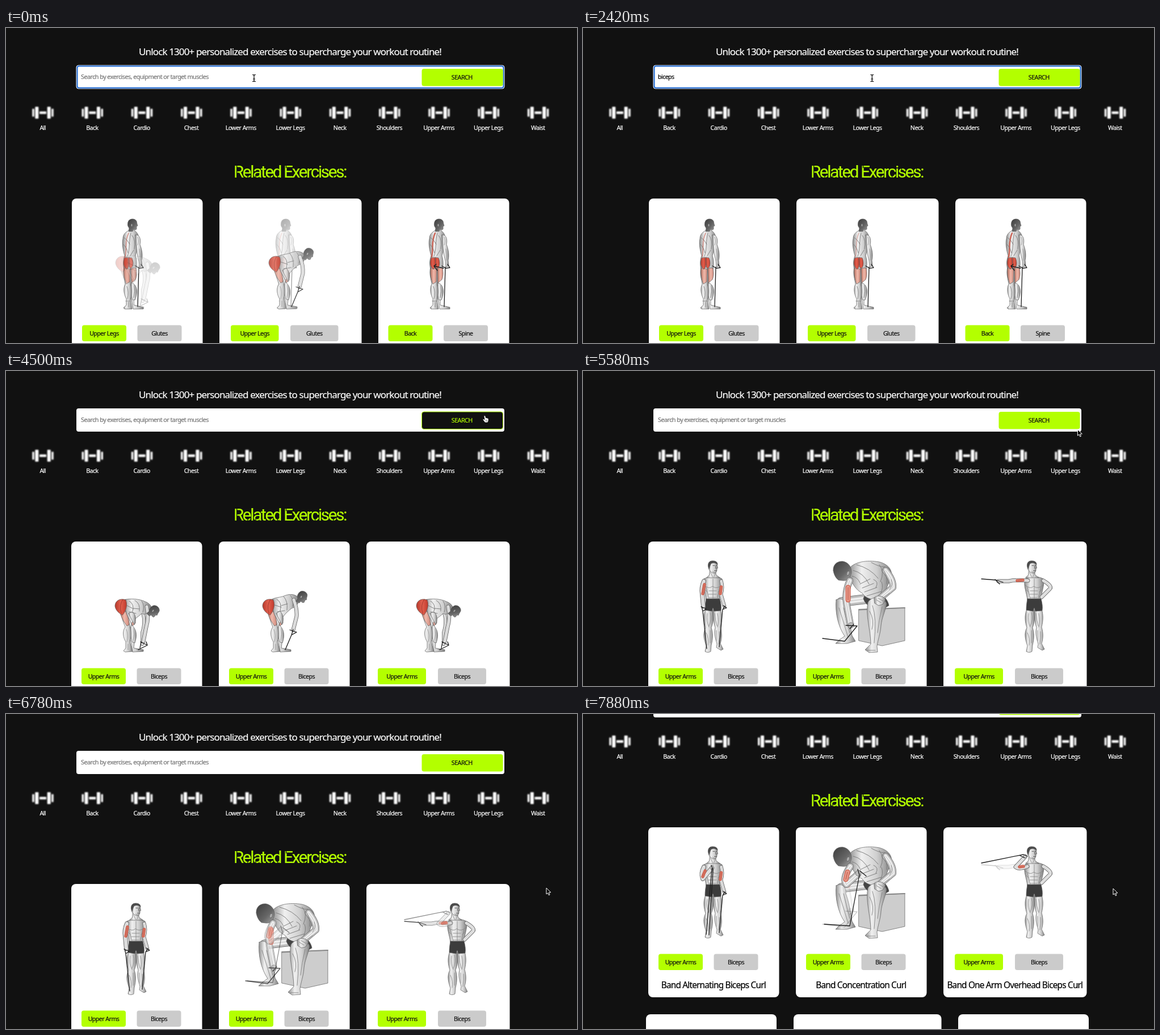
Recreate the animation shown at these times as an HTML page. Size 1006 by 556 pixels, loop 8 s.

```html
<!DOCTYPE html>
<html lang="en">
<head>
<meta charset="utf-8">
<title>Exercise search</title>
<style>
html, body { margin: 0; width: 100%; height: 100%; overflow: hidden; background: #111; }
svg { display: block; width: 100%; height: 100%; }
text { font-family: "Noto Sans", "Open Sans", sans-serif; letter-spacing: -.052em; white-space: pre; stroke-width: .2px; }
#title { font: 400 29.5px Roboto, Inter, sans-serif; letter-spacing: -2.25px; fill: #b3ff00; stroke: #b3ff00; }
path { stroke-linecap: round; stroke-linejoin: round; }
</style>
</head>
<body>
<svg id="stage" viewBox="0 0 1006 556">
  <defs>
    <linearGradient id="skin">
      <stop offset="0" stop-color="#8c8c8c"/><stop offset=".3" stop-color="#f0f0f0"/>
      <stop offset=".65" stop-color="#d0d0d0"/><stop offset="1" stop-color="#828282"/>
    </linearGradient>
    <linearGradient id="red">
      <stop offset="0" stop-color="#b5382b"/><stop offset=".5" stop-color="#e2604e"/>
      <stop offset="1" stop-color="#c03a2c"/>
    </linearGradient>
    <linearGradient id="pale">
      <stop offset="0" stop-color="#b9705f"/><stop offset=".5" stop-color="#f0b9ab"/>
      <stop offset="1" stop-color="#cf8a7c"/>
    </linearGradient>
    <linearGradient id="hair" x2="1" y2="1">
      <stop offset="0" stop-color="#3c3c3c"/><stop offset=".6" stop-color="#666"/>
      <stop offset="1" stop-color="#a5a5a5"/>
    </linearGradient>
    <filter id="soft"><feGaussianBlur stdDeviation="1"/></filter>
  </defs>
  <g id="page"></g>
  <g id="pointer"></g>
</svg>
<script>
const LOOP = 8000, LIME = '#b3ff00', DARK = '#111';
const $ = id => document.getElementById(id);
const set = (id, attrs) => { for (const k in attrs) $(id).setAttribute(k, attrs[k]); };
const show = (id, on) => set(id, { display: on ? 'inline' : 'none' });

// Drawing helpers
const rect = (x, y, w, h, r, fill, more = '') =>
  `<rect x="${x}" y="${y}" width="${w}" height="${h}" rx="${r}" fill="${fill}" ${more}/>`;
const label = (x, y, str, size = 10.65, fill = '#fff', anchor = 'middle', more = '') =>
  `<text x="${x}" y="${y}" font-size="${size}" fill="${fill}" stroke="${fill}" text-anchor="${anchor}" ${more}>${str}</text>`;
const group = (id, body) => `<g id="${id}">${body}</g>`;
const shape = (d, fill = 'url(#skin)') => `<path d="${d}" fill="${fill}" stroke="#5c5c5c" stroke-width=".7"/>`;
const line = (d, w = .6, c = '#777') => `<path d="${d}" fill="none" stroke="${c}" stroke-width="${w}"/>`;
const limb = (d, w) => line(d, w, '#666') + line(d, w - 1.3, '#bcbcbc') + line(d, w * .5, '#eee') + line(d, .5, '#999');
const band = d => line(d, 1.3, '#1c1c1c');
const ellipse = (x, y, rx, ry, fill, turn = 0) =>
  `<ellipse cx="${x}" cy="${y}" rx="${rx}" ry="${ry}" fill="${fill}" stroke="#555" stroke-width=".6" transform="rotate(${turn} ${x} ${y})"/>`;

// Head seen from the side and behind
const sideHead = (x, y, turn) => `<g transform="translate(${x} ${y}) rotate(${turn})">` +
  shape('M-7 -4C-6 -11 5 -12 8 -6L9 -1L10 2L8 3L8 8C6 10 3 9 2 8L1 12L-6 12L-5 6C-8 3 -8 -1 -7 -4Z', 'url(#hair)') +
  ellipse(-.5, 1, 1.4, 2.5, '#aaa') + '</g>';

// Head seen from the front, turned a little to the right
const frontHead = (x, y) => `<g transform="translate(${x} ${y})">` +
  shape('M-5 5L-6 14L-11 19L13 19L6 14L5 6Z') +
  line('M-4 9L0 18M5 9L2 18', .7) +
  shape('M-8 -3C-7 -11 8 -12 8 -3L9 2L7.500 3C8 7 6 11 3 11C-1 11 -6 7 -7 3Z') +
  shape('M-7 2C-10 -7 -6 -11 0 -11C6 -11 9 -8 8.500 -4C5 -8 1 -8 -3 -6L-5 -1L-6 3Z', '#4a4a4a') +
  line('M.5 -2.500h3M5.500 -2.500h2M5 -1L6 3M3 6.500h4', .9, '#555') +
  line('M0 8C2 10 5 10 6 8', 1, '#888') + '</g>';

const standing = spine =>
  shape('M219 422C220 434 222 444 221 452C219 462 222 472 225 480L225 489L242 493L242 496L224 496L222 484C217 470 217 440 216 424Z') +
  shape('M221 450C231 452 233 466 227 480L223 480C219 470 219 460 221 450Z') +
  shape('M217 357C211 360 206 364 206 372C204 380 206 392 209 402C206 410 206 418 208 426L229 426C231 416 230 408 228 402C231 392 234 384 234 372C234 364 230 360 226 357Z') +
  shape('M208 422C205 434 209 444 210 452C206 460 208 470 212 478L212 489L207 494L209 496L222 496L219 480C222 470 222 460 219 452C221 440 221 430 219 422Z') +
  shape('M208 424C207 434 209 444 212 452L218 448L219 426Z', 'url(#pale)') +
  shape('M220 424L221 450L228 444C231 436 230 430 229 424Z', 'url(#pale)') +
  shape('M209 406C206 414 207 422 213 426C217 424 218 412 215 405Z', 'url(#red)') +
  shape('M216 405C217 414 216 422 219 424C225 424 225 412 222 406Z', 'url(#red)') +
  line('M216 362C209 376 213 390 210 404', spine, '#c96153') +
  line('M220 362C216 376 219 390 214 403M208 370Q214 374 218 382M222 366Q229 374 226 390M207 382Q213 388 215 397M225 392L219 402M213 456Q217 466 214 478M226 454Q228 464 225 476M211 482h8M216 484v9', .8, '#707070') +
  shape('M228 365C236 364 238 374 236 382C240 392 241 402 239 410L240 420L235 422L234 411C231 400 230 390 229 382Z') +
  line('M232 369Q235 376 232 383M235 390Q237 400 236 410', .6) +
  sideHead(222, 347, 0) +
  band('M234 422L232 492M235 424L228 420M238 417L242 423L235 424');

const bentLegs =
  shape('M214 424C222 434 224 444 222 453C219 464 223 474 227 481L226 489L243 492L243 495L224 496L221 478C215 462 212 442 204 426Z') +
  shape('M222 448C232 456 232 468 228 480L223 478C220 466 218 456 222 448Z') +
  shape('M203 422C204 436 209 446 211 452C205 460 208 472 212 478L212 489L208 494L211 496L224 495L219 478C222 470 222 460 219 451C218 442 214 430 210 422Z') +
  shape('M201 422C203 434 209 443 214 450L218 448C218 438 214 428 211 423Z', 'url(#pale)') +
  shape('M212 424C218 434 221 442 224 450L229 445C229 436 223 430 219 425Z', 'url(#pale)') +
  line('M213 456Q217 466 214 478M226 454Q228 464 225 476M216 482v10M231 491l5 2', .6);
const rump =
  shape('M212 404C200 400 193 407 193 415C194 423 201 428 206 431C212 425 216 413 212 404Z', 'url(#red)') +
  line('M207 403Q200 412 204 428', .7, '#8b2a20');

const bentLow = bentLegs +
  limb('M240 422Q248 440 241 462L241 482', 6) +
  shape('M207 404C220 401 236 402 246 407C254 410 259 416 257 422C252 428 246 431 240 428C232 436 226 437 222 446L214 430C210 420 212 410 207 404Z') +
  shape('M224 425C230 430 231 440 227 448L217 428Z') +
  line('M218 406Q228 412 224 424M228 405Q238 410 236 424M240 406Q246 414 242 426M214 414l12 6M226 419l10 1M218 425l12 3', .9, '#777') +
  rump + limb('M249 416Q253 436 248 452L243 477', 7) +
  sideHead(261, 423, 42) + band('M238 478L250 484M248 478L250 484L234 492M239 478L237 489');

const bentHigh = bentLegs +
  shape('M207 404C216 399 224 400 231 397C240 393 251 393 257 401C258 412 250 417 244 419C234 427 227 434 223 446L214 430C210 420 212 410 207 404Z') +
  shape('M224 424C230 430 231 440 227 448L217 428Z') +
  line('M218 403Q228 408 224 424M230 398Q238 406 236 422M242 396Q249 404 246 416M214 413l12 4M226 414l11 -3M219 425l13 -2', .9, '#777') +
  rump + limb('M248 404Q254 420 253 433L247 457', 7) +
  sideHead(262, 398, 24) + band('M241 457L253 461L244 466L233 492M247 456L244 466');

// Legs, shorts and torso shared by the two front views
const frontBody =
  shape('M216 420C211 432 213 444 216 453C210 464 214 476 217 485L215 495C218 497 222 497 225 495L226 484C229 472 229 462 226 453C230 444 230 432 229 422Z') +
  shape('M229 422C229 434 230 444 233 453C230 464 234 474 236 482L235 488L243 493L247 491L242 481C245 472 245 462 242 452C245 440 245 430 242 420Z') +
  shape('M213 367C220 362 238 362 245 367C248 376 242 390 240 405L217 405C216 392 209 378 213 367Z') +
  shape('M217 402L241 402C243 410 244 416 243 423L231 424L229 418L227 424L215 422C215 414 216 408 217 402Z', '#3c3c3c') +
  line('M229 367V402M213 378Q222 386 228 380Q236 386 244 378M222 388h13M221 394h14M222 400h12M217 382L222 402M241 382L236 402M215 386l4 4M242 386l-4 4M219 428Q217 442 222 452M224 426Q227 440 222 450M237 428Q240 442 237 452M232 428Q233 440 236 450M217 462Q222 472 220 484M240 460Q241 470 239 482M224 458v22M235 458v18', .8, '#808080');
const armMuscle = d => line(d, 5.2, '#c8503e') + line(d, 3, '#e68370') + line(d, .6, '#933a2e');
const curlBase = frontBody + frontHead(228.5, 346) +
  limb('M243.500 371Q247 382 243 394L249 415', 6.5) + armMuscle('M243.500 381L242 393') +
  band('M247 414L253 418L246 421L240 487M250 415L246 421');
const curlDown = limb('M213 371Q208 382 210 394L212 415', 8) + armMuscle('M214 377L211 393') +
  band('M208 416L217 420L211 424L218 490M209 416L211 424');
const curlUp = limb('M213 371Q207 382 211 392L227 373', 8) + armMuscle('M215 378L211 388') +
  ellipse(227, 372, 3, 3.5, '#ccc') + band('M226 368L229 376L222 491M227 374L217 490');

const seatBase =
  shape('M486 422L567 418V476L527 485L486 476Z', '#cdcdcd') + line('M486 421L567 418', 2, '#888') +
  limb('M503 402Q476 405 455 408', 17) +
  shape('M446 404C454 399 464 404 463 418C468 432 471 448 474 467L480 477L465 481L445 481L451 475L461 468C449 450 444 426 446 404Z') +
  shape('M500 387C520 388 536 398 539 414L525 422C512 422 498 414 494 402Z', '#444') +
  shape('M468 350C476 337 500 333 522 337C538 341 546 352 543 364C538 376 534 384 530 398C514 408 498 402 492 392C480 386 470 372 468 350Z') +
  line('M482 342Q506 348 520 366M476 352Q494 356 504 376M488 376l18 -9M492 383l20 -8M496 390l22 -8M500 397l26 -8M522 342Q532 354 524 372M508 338Q522 346 532 346M474 362Q484 364 488 374M526 372Q530 382 524 394M512 368Q522 372 516 382', .9, '#777') +
  limb('M533 352Q547 368 546 382L521 403', 12) +
  line('M529 350Q537 362 535 376M543 368Q547 378 540 386M540 392l-14 10', .8) +
  shape('M502 408C510 395 531 398 535 411C532 426 526 436 525 450C524 464 519 476 518 486L519 496L504 497L497 492L507 482C507 458 497 430 502 408Z') +
  shape('M513 400C519 394 532 398 533 404L528 412L521 414L514 410Z') +
  line('M510 414Q518 436 513 480M527 416Q521 440 519 462M505 424Q514 440 509 456M451 418Q460 446 467 470M459 418Q464 440 470 462M501 493h14M517 404l8 5M520 401l9 5', .8, '#777') +
  shape('M441 352C440 342 448 335 458 336C468 338 473 346 473 355C472 364 466 371 458 370L450 369C446 366 442 360 441 352Z', 'url(#hair)') +
  ellipse(467, 357, 2.5, 4, '#aaa', 20);
const seatMuscle = d => line(d, 9, '#d06655') + line(d, 6, '#e89a8a') + line(d, 1, '#b84a3a');
const seatDown = limb('M470 370Q460 392 465 414L471 447', 12) + seatMuscle('M467 382L467 404') +
  ellipse(472, 449, 5, 5, '#bbb') + band('M463 449L483 450L461 477L422 472M477 447L470 455');
const seatUp = limb('M471 370Q456 392 464 402L484 384', 12) + seatMuscle('M466 380L463 393') +
  ellipse(485, 382, 5, 5, '#bbb') + band('M484 375L487 385L470 475L425 472M488 378L499 387');

const pullBase = `<g transform="translate(566 0)">${frontBody}${limb('M245 370Q262 380 256 385L242 399', 7)}</g>` +
  frontHead(790.5, 346);
const pullOut = limb('M784 370Q764 368 750 371L732 371', 7) + armMuscle('M775 369L765 370') +
  band('M740 373L728 369L702 367M734 376L726 368');
const pullIn = limb('M783 370Q768 376 762 371L779 353', 7) + armMuscle('M776 370L769 371') +
  ellipse(779, 352, 3, 3, '#ccc') + band('M783 352L776 349L702 364M778 355L770 351');

// Page
const icon = [-1, 1].map(s => rect(s * 17 - 1.7, -7, 3.4, 14, 1, '#fff') + rect(s * 10.7 - 3, -10.5, 6, 21, 1, '#fff')).join('') +
  rect(-6, -2.2, 12, 4.4, 1, '#fff');
const parts = ['All', 'Back', 'Cardio', 'Chest', 'Lower Arms', 'Lower Legs', 'Neck', 'Shoulders', 'Upper Arms', 'Upper Legs', 'Waist'];
const menu = parts.map((name, i) => {
  const x = 65 + 87.25 * i;
  return `<g transform="translate(${x} 149.5)" filter="url(#soft)">${icon}</g>` + label(x - .3, 179.5, name);
}).join('');

// Card: left, width, badge x, badge gap, badge width, area, muscle, title
const card = ([x, w, bx, gap, bw, area, muscle, title]) =>
  rect(x, 301, w, 300, 8, '#fff') +
  rect(bx, 524.5, bw, 28.5, 4, LIME) + label(bx + bw / 2, 542.6, area, 10.65, DARK) +
  rect(bx + gap, 524.5, bw, 28.5, 4, '#cbcbcb') + label(bx + gap + bw / 2, 542.6, muscle, 10.65, DARK) +
  label(x + w / 2 - .4, 585, title, 15.35, '#000');
const before = [
  [116, 230.5, 134, 97.5, 78, 'Upper Legs', 'Glutes', ''],
  [376, 250.5, 396, 105, 84.5, 'Upper Legs', 'Glutes', ''],
  [656, 230.5, 673.5, 97.5, 78, 'Back', 'Spine', '']];
const after = [
  [115, 230.5, 133, 97.5, 78, 'Upper Arms', 'Biceps', 'Band Alternating Biceps Curl'],
  [375, 230.5, 393, 97.5, 78, 'Upper Arms', 'Biceps', 'Band Concentration Curl'],
  [635, 252.5, 655, 106, 85, 'Upper Arms', 'Biceps', 'Band One Arm Overhead Biceps Curl']];
const nextRow = [[111, 230], [371, 260.5], [661, 230]];

const fade = (name, a, b) => group(name + 'A', a) + group(name + 'B', b);
const lifts = [
  ['lift0', standing(1), bentLow], ['lift1', standing(.6), bentHigh],
  ['lift2', standing(2.4) + band('M231 424L214 420L220 428M214 420L218 417'), bentLow]
].map(([name, a, b]) => group(name, fade(name, a, b))).join('');
const curls = curlBase + fade('curl', curlDown, curlUp) + seatBase + fade('seat', seatDown, seatUp) +
  pullBase + fade('pull', pullOut, pullIn);

$('page').innerHTML =
  label(500.5, 48, 'Unlock 1300+ personalized exercises to supercharge your workout routine!', 17) +
  rect(124, 66, 754, 41, 4, '#fff') +
  group('ring', rect(123.5, 65.5, 755, 42, 4.5, '#fff') + rect(125.5, 67.3, 751, 38.4, 3, '#fff', 'stroke="#1763cf" stroke-width="2"')) +
  label(132, 90.3, 'Search by exercises, equipment or target muscles', 10.87, '#757575', 'start', 'id="hint"') +
  label(132, 90.3, '', 10.6, '#000', 'start', 'id="query"') +
  rect(0, 80.5, 1, 12.5, 0, '#000', 'id="caret"') +
  rect(732.5, 72, 143, 30.5, 4, LIME, 'id="button"') +
  label(803.3, 91, 'SEARCH', 10.8, DARK, 'middle', 'id="go"') +
  menu +
  '<text id="title" x="500" y="263.500" text-anchor="middle">Related Exercises:</text>' +
  '<path id="slits" stroke="#111" stroke-width="1.3"/>' +
  group('before', before.map(card).join('')) +
  group('after', after.map(card).join('') + nextRow.map(([x, w]) => rect(x, 631, w, 300, 8, '#fff')).join('')) +
  group('lifts', lifts) + group('curls', curls);

$('pointer').innerHTML =
  group('beam', line('M-2.500 -5.500Q0 -5.500 0 -4V5Q0 6.500 -2.500 6.500M2.500 -5.500Q0 -5.500 0 -4M0 5Q0 6.500 2.500 6.500M-1.500 2h3', 1.2, '#000')) +
  group('hand', '<path d="M-3 -5.500C-2 -7 -.5 -6 0 -4L.5 -2L2 -2.500L3 -1.500L5 -1.500V3L3.500 6H-1L-5 1L-4.500 -.5L-2 .5Z" fill="#fff" stroke="#000" stroke-width=".7"/>' + line('M.5 1v3M2.300 1v3', .6, '#333')) +
  group('arrow', '<path d="M0 0V10.500L2.500 8.300L4.300 12.300L6 11.500L4.300 7.600L7.500 7.400Z" fill="#000" stroke="#fff" stroke-width="1"/>');

// Stencil gaps in the heading: place across the letter, top, bottom
const slitAt = { R: [.36, -22, 1], E: [.3, -22, -17], e: [.68, -5, 1], a: [.35, -5, 1], d: [.6, -5, 1], c: [.6, -5, 1], s: [.5, -17, -12] };
const title = $('title');
set('slits', {
  d: [...title.textContent].map((ch, i) => {
    if (!slitAt[ch]) return '';
    const [f, top, end] = slitAt[ch], a = title.getStartPositionOfChar(i).x, b = title.getEndPositionOfChar(i).x;
    return `M${a + (b - a) * f} ${263.5 + top}V${263.5 + end}`;
  }).join('')
});

// The screen refreshes only at these moments: start, end, count
const ticks = [0];
[[150, 780, 5], [1080, 2120, 8], [2270, 3310, 8], [3460, 3610, 2], [4210, 4500, 3],
 [5400, 6340, 7], [6490, 7110, 5], [7290, 7440, 2], [7590, 7880, 3]].forEach(([a, b, n]) => {
  for (let k = 0; k < n; k++) ticks.push(a + (b - a) * k / (n - 1));
});

const clamp = v => Math.max(0, Math.min(1, v));
const track = (keys, t) => {
  const i = keys.findIndex(k => k[0] > t);
  if (i === 0) return keys[0].slice(1);
  if (i < 0) return keys[keys.length - 1].slice(1);
  const a = keys[i - 1], b = keys[i], f = (t - a[0]) / (b[0] - a[0]);
  return a.slice(1).map((v, j) => v + (b[j + 1] - v) * f);
};
const mouse = [[2270, 437, 88], [2420, 510, 88], [2720, 790, 86], [2870, 845, 85], [5400, 845, 85], [5560, 872, 104],
  [5710, 905, 170], [5870, 938, 250], [6030, 951, 303], [6180, 951.5, 310.5], [6490, 951.5, 310.5], [7110, 953.5, 298.5], [7290, 941, 304], [7440, 934, 308.5]];
const scroll = [[6490, 0], [6645, 1], [6800, 5], [6955, 18], [7110, 41.5], [7290, 82], [7440, 101]];

// Cross-fade cycle: rise start, fall start, period
const cycles = [[-120, 1405, 3050], [-400, 1010, 2900], [0, 1530, 2950]];
const mixAt = ([rise, fall, period], t) => {
  const u = (t - rise) % period;
  return clamp(u / 600) - clamp((u - fall + rise) / 600);
};
const blend = (name, m) => {
  set(name + 'A', { opacity: clamp(1.25 * (1 - m)) });
  set(name + 'B', { opacity: clamp(1.25 * m) });
};

function draw(time) {
  const t = ticks.filter(v => v <= time).pop();
  const focus = t < 3460, found = t >= 4210, loaded = t >= 5400;

  const typed = focus ? [300, 460, 620, 1080, 1225, 1375].filter(v => v <= t).length : 0;
  $('query').textContent = 'biceps'.slice(0, typed);
  show('ring', focus);
  show('hint', !typed);
  show('caret', typed && (t < 1375 || (t - 1375) % 1060 < 530));
  set('caret', { x: 132 + $('query').getComputedTextLength() });

  const [x, y] = track(mouse, t);
  const hover = x > 732 && x < 876 && y > 72 && y < 103;
  const kind = hover ? 'hand' : t < 3000 ? 'beam' : 'arrow';
  ['beam', 'hand', 'arrow'].forEach(k => show(k, k === kind));
  set('pointer', { transform: `translate(${x} ${y})` });
  set('button', { fill: hover ? DARK : LIME, stroke: hover ? LIME : 'none' });
  set('go', { fill: hover ? LIME : DARK, stroke: hover ? LIME : DARK });

  show('before', !found);
  show('after', found);
  show('lifts', !loaded);
  show('curls', loaded);
  cycles.forEach((c, i) => {
    const shift = found ? [-1, 259, 530][i] : 270 * i;
    set('lift' + i, { transform: `translate(${shift} 0)` });
    blend('lift' + i, mixAt(c, Math.min(t, 3610)));
  });
  blend('curl', clamp((t - 7200) / 500));
  const pull = clamp((t - 6450) / 500) - clamp((t - 7790) / 500);
  blend('seat', pull);
  blend('pull', pull);
  set('page', { transform: `translate(0 ${-track(scroll, t)[0]})` });
}

const start = performance.now();
function tick() {
  draw((performance.now() - start) % LOOP);
  requestAnimationFrame(tick);
}
tick();
</script>
</body>
</html>
```
